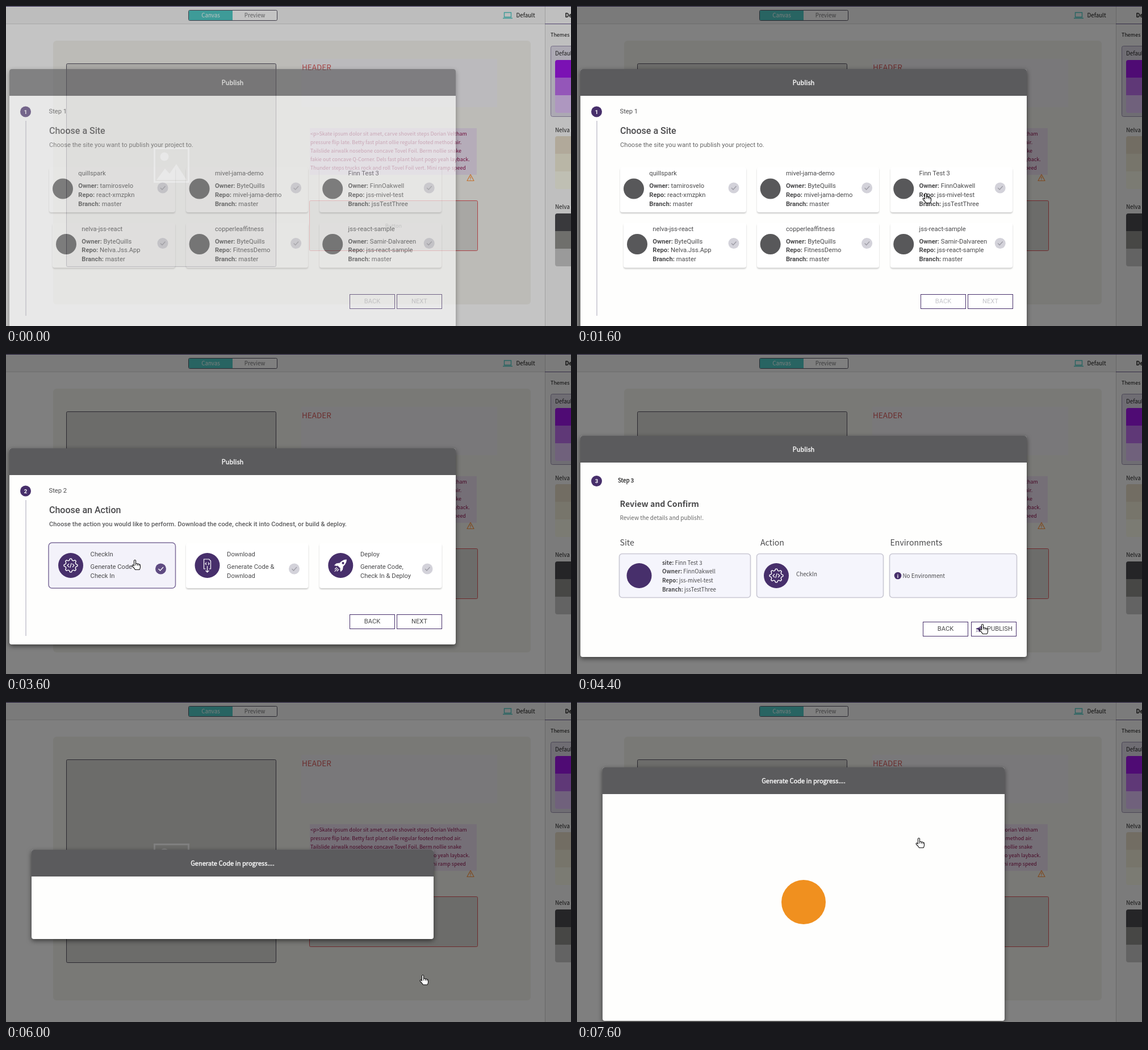
Animation of 995x563 px, one loop 8000 ms. Source, as an HTML page:

```html
<!DOCTYPE html>
<html lang="en">
<head>
<meta charset="utf-8">
<title>Publish dialog</title>
<style>
html, body { margin: 0; width: 100%; height: 100%; overflow: hidden; background: #fff; }
svg { display: block; }
text { font: 11.2px Roboto, sans-serif; fill: #4a4a4c; white-space: pre; }
.n { font-family: "Noto Sans CJK JP", "Noto Sans CJK SC", "Noto Sans CJK", "Noto Sans", sans-serif; font-size: 9.8px; }
.m { text-anchor: middle; }
.b, .b tspan { font-weight: 700; }
.h { font-size: 16px; font-weight: 500; }
</style>
</head>
<body>
<svg id="stage" width="995" height="563" viewBox="0 0 995 563"></svg>
<script>
const PURPLE = '#472f6b', LOOP = 8000, STEP = 200, MID = 338.5;

const text = (x, y, s, cls = '', style = '') =>
  `<text x="${x}" y="${y}" class="${cls}" style="${style}">${s.replace(/&/g, '&amp;').replace(/<(?!\/?tspan)/g, '&lt;')}</text>`;
const rect = (x, y, w, h, fill, more = '') =>
  `<rect x="${x}" y="${y}" width="${w}" height="${h}" fill="${fill}" ${more}/>`;
const box = (x, y, w, h, fill, stroke, r = 0, sw = 1) =>
  rect(x + .5, y + .5, w - 1, h - 1, fill, `stroke="${stroke}" stroke-width="${sw}" rx="${r}"`);
const disc = (x, y, r, fill) => `<circle cx="${x}" cy="${y}" r="${r}" fill="${fill}"/>`;
const line = (d, stroke, sw = 1, more = '') =>
  `<path d="${d}" fill="none" stroke="${stroke}" stroke-width="${sw}" ${more}/>`;
const at = (x, y, s, more = '') => `<g transform="translate(${x} ${y}) ${more}">${s}</g>`;
const pair = (key, value) => `<tspan font-weight="700">${key}:</tspan> ${value}`;
const semibold = color => `fill:${color};stroke:${color};stroke-width:.35px`;

// ---- icons, centred on 0,0
function gear() {
  let d = '';
  for (let i = 0; i < 32; i++) {
    const a = (i - .5) * Math.PI / 16, r = i % 4 < 2 ? 12 : 9.3;
    d += (i ? 'L' : 'M') + (r * Math.cos(a)).toFixed(1) + ' ' + (r * Math.sin(a)).toFixed(1);
  }
  return line(d + 'Z', '#fff', 1.4, 'stroke-linejoin="round"') +
    line('M-3 -3L-6 0L-3 3M3 -3L6 0L3 3M1.3 -4L-1.3 4', '#fff', 1.2);
}
const file = () => line('M-3 6H-6V-11H3L6 -8V6H3M0 1V12M-3 9L0 12L3 9M-1.5 -5L-3.5 -3L-1.5 -1M1.5 -5L3.5 -3L1.5 -1', '#fff', 1.2);
const rocket = (body, hole) =>
  `<g transform="rotate(45)"><path d="M0 -15C5 -10 5 -3 3.5 4H-3.5C-5 -3 -5 -10 0 -15ZM-4.5 -2L-8 3V8L-3.5 5ZM4.5 -2L8 3V8L3.5 5Z" fill="${body}"/>` +
  disc(0, -6, 2, hole) + line('M-2.5 7V12M0 7V15M2.5 7V12', body, 1.2) + '</g>';
const badge = (x, y, icon) => disc(x, y, 22, PURPLE) + at(x, y, icon);
const check = (x, y, on) => disc(x, y, 9.5, on ? '#5f4b82' : '#d3d2da') +
  line(`M${x - 4} ${y}l3 3l5.5 -6`, on ? '#fff' : '#9c9ba4', 1.3);

// ---- page behind the dialog
const prose = [
  '<p>Skate ipsum dolor sit amet, carve shoveit steps Dorian Veltham',
  'pressure flip late. Betty fast plant ollie regular footed method air.',
  'Tailslide airwalk nosebone concave Tovel Foil. Berm nollie snake',
  'fakie out concave Q-Corner. Dels fast plant blunt pogo yeah layback.',
  'Thunder steps trucks rock and roll Tovel Foil vert. Mini ramp speed'];

function swatches(y, colors) {
  const bands = colors.map((c, i) => rect(967, y + i * 31, 40, 31, c)).join('');
  return `<g style="clip-path:inset(0 0 0 0 round 4px)">${bands}</g>`;
}

function page() {
  const edge = '#555060', grey = '#dad9d5', red = '#e0555a', teal = '#50cac5';
  return rect(0, 0, 995, 563, '#fff') + rect(0, 0, 995, 31, '#f6f6f5') + rect(0, 31, 949, 1, '#dcdcdc') +
    rect(83, 61, 841, 464, '#f4f3ee', 'rx="6"') +
    box(106, 101, 370, 358, grey, edge, 2) +
    line('M261.5 250.5H321.5V309.5H261.5Z', '#fff', 3) + disc(279, 265, 7.5, '#fff') +
    '<path d="M265 306L280 286L288 295L300 278L318 306Z" fill="#fff"/>' +
    rect(520, 93, 345, 85, '#f3f2f6') +
    text(521, 112.5, 'HEADER', 'n', 'font-size:13.5px;fill:#d85a5a') +
    rect(535, 215, 294, 82, '#ebe0f0') +
    prose.map((s, i) => text(536, 227.5 + i * 15.1, s, 'n', 'font-size:8.92px;fill:#90104c')).join('') +
    line('M818 296.5L824 307.5H812ZM818 300V304M818 305V306.3', '#ff9540', 1.2, 'stroke-linejoin="round"') +
    box(534, 342, 297, 89, grey, red, 2) +
    text(682.5, 389.5, 'Button', 'n m', 'font-size:9.2px;fill:#777') +
    // toolbar
    box(321, 7, 157, 19, '#fff', edge, 2) + rect(322, 8, 77, 17, teal) +
    text(360.5, 20, 'Canvas', 'n m', 'fill:#fff') + text(438, 20, 'Preview', 'n m', 'fill:#77777a') +
    line('M877.5 11.5H889.5V19.5H877.5ZM875 21.5H892', teal, 1.4) + text(898.5, 20, 'Default', 'n', 'fill:#111') +
    // themes
    rect(949, 0, 46, 563, '#f8f8f8') + rect(949, 0, 1, 563, '#d0d0d0') + rect(949, 31, 46, 1, '#6a5a90') +
    text(984.5, 20, 'Design', 'n b', 'fill:#111') + text(959, 54, 'Themes', 'n', 'font-size:9px;fill:#111') +
    box(959, 70, 60, 125, '#dfdbe8', '#9a90b0', 3) +
    text(967, 87, 'Default', 'n', 'fill:#222') + swatches(95, ['#a016ea', '#c070f0', '#e2c4fa']) +
    text(967, 221.5, 'Nelva', 'n', 'fill:#222') + swatches(229, ['#e6dcc8', '#f0ecd8', '#f8f8e8']) +
    text(967, 356.5, 'Nelva', 'n', 'fill:#222') + swatches(365, ['#4a4a4e', '#90908c', '#c8c8c8']) +
    rect(0, 0, 995, 1, '#3a2c68');
}

// ---- dialog parts
function button(x, y, label, on = true, dx = 0) {
  return box(x, y, 80, 26, '#fff', PURPLE) +
    text(x + 40 + dx, y + 15.5, label, 'm', on ? '' : 'fill:#c4c4ca');
}
const marker = (n, y) => disc(34.5, y, 9.5, PURPLE) + text(34.5, y + 3.5, '' + n, 'm b', 'font-size:9.5px;fill:#fff');
const rail = (y, end) => rect(34, y, 2, end - y, '#d3d2da');
const shadowed = 'style="filter:drop-shadow(0 2px 1px #0003)" rx="4"';

function card(x, y, w, on) {
  return on ? rect(x - 4, y - 1, w + 8, 80, '#f3f2fa', 'rx="6" stroke="#7d6d9b" stroke-width="1.5"')
            : rect(x, y, w, 79, '#fff', shadowed);
}

function dialog(x, w, full, k, title, body, alpha = 1) {
  const h = Math.round(157 + (full - 157) * k), y = Math.floor(MID - h / 2);
  return `<g opacity="${alpha}">` +
    rect(x, y, w, h, '#fefefd', 'rx="4" style="filter:drop-shadow(0 3px 4px #0008)"') +
    `<path d="M${x} ${y + 47}V${y + 4}q0 -4 4 -4H${x + w - 4}q4 0 4 4V${y + 47}Z" fill="#5b5b5d"/>` +
    text(399, y + 28, title, 'n m', 'font-size:11.05px;' + semibold('#fff')) +
    `<svg x="${x}" y="${y}" width="${w}" height="${h}" viewBox="${x} ${Math.floor(MID - full / 2)} ${w} ${h}">${body}</svg></g>`;
}

const sites = [
  ['quillspark', 'tamirosvelo', 'react-xmzpkn', 'master'],
  ['mivel-jama-demo', 'ByteQuills', 'mivel-jama-demo', 'master'],
  ['Finn Test 3', 'FinnOakwell', 'jss-mivel-test', 'jssTestThree'],
  ['nelva-jss-react', 'ByteQuills', 'Nelva.Jss.App', 'master'],
  ['copperleaffitness', 'ByteQuills', 'FitnessDemo', 'master'],
  ['jss-react-sample', 'Samir-Dalvareen', 'jss-react-sample', 'master']];

function siteStep(chosen, alpha) {
  let s = marker(1, 186) + rail(202, 545) + text(75.5, 189, 'Step 1') +
    text(76, 225, 'Choose a Site', 'h') + text(76, 248, 'Choose the site you want to publish your project to.', '', 'fill:#666');
  sites.forEach(([name, owner, repo, branch], i) => {
    const col = i % 3, y = i < 3 ? 0 : 97.5, x = i % 3 || i ? 106 + col * 234.6 : 100;
    const left = i ? [82, 317, 552][col] : 76, on = chosen && i === 2;
    s += card(left, 284 + y, [298, 532, 767][col] - left, on) + disc(x, 321.5 + y, 18, '#58585a') +
      text(x + 27.3, 298 + y, name) + check(276 + col * 234.6, 320 + y, on);
    [['Owner', owner], ['Repo', repo], ['Branch', branch]].forEach(([key, value], j) =>
      s += text(x + 27.3, 320 + y + j * 15.8, pair(key, value)));
  });
  s += button(605, 507, 'BACK', false) + button(688, 507, 'NEXT', chosen);
  return dialog(6, 786, 455, 1, 'Publish', s, alpha);
}

const actions = [
  ['CheckIn', 'Generate Code &', 'Check In', gear()],
  ['Download', 'Generate Code &', 'Download', file()],
  ['Deploy', 'Generate Code,', 'Check In & Deploy', rocket('#fff', PURPLE)]];

function actionStep(k, chosen) {
  let s = text(76, 280, 'Choose an Action', 'h') +
    text(76, 302.5, 'Choose the action you would like to perform. Download the code, check it into Codnest, or build & deploy.', '', 'font-weight:500;fill:#5c5c5e');
  actions.forEach(([name, a, b, icon], i) => {
    const x = [114, 354.5, 589.3][i], on = chosen && !i;
    s += card([79, 317, 552][i], 333, 215.5, on) + badge(x, 372, icon) +
      text(x + 34.6, 356, name) + text(x + 34.6, 378, a) + text(x + 34.6, 394, b) + check([272.5, 507.5, 742][i], 378, on);
  });
  s += button(605, 458, 'BACK') + button(688, 458, 'NEXT', chosen);
  return dialog(6, 786, 345, k, 'Publish', marker(2, 241) + text(75.5, 244, 'Step 2') +
    rail(257, 263 + 233 * k) + `<g opacity="${k}">${s}</g>`);
}

function reviewStep(k, alpha) {
  const panel = (x, w, name, dx) => text(x + dx, 337, name, 'n', 'font-size:14.1px') +
    box(x, 351, w, 78, '#f5f5fc', '#c9c8d3', 5, 1.6);
  const facts = [['site', 'Finn Test 3'], ['Owner', 'FinnOakwell'], ['Repo', 'jss-mivel-test'], ['Branch', 'jssTestThree']];
  const s = text(75.5, 268.5, 'Review and Confirm', 'n b', 'font-size:14.1px') +
    text(75.5, 292, 'Review the details and publish!.', 'n', 'font-size:10px;fill:#666') +
    panel(74, 232, 'Site', 1.5) + panel(316, 224, 'Action', 7) + panel(550, 225, 'Environments', 1.5) +
    disc(109.5, 390, 22, PURPLE) +
    facts.map(([key, value], i) => text(150, 370.5 + i * 15.8, pair(key, value), 'n', 'font-size:9.7px')).join('') +
    badge(351, 390, gear()) + text(386, 391, 'CheckIn', 'n') +
    disc(565, 390, 6.3, PURPLE) + text(565, 393.5, 'i', 'm b', 'font-size:9px;fill:#fff') + text(573.5, 393.5, 'No Environment', 'n') +
    button(609, 471, 'BACK') + button(694, 471, 'PUBLISH', true, 10.5) + at(708, 484, rocket(PURPLE, '#fff'), 'scale(.5)');
  return dialog(6, 786, 389, k, 'Publish', marker(3, 223.5) + text(72, 226, 'Step 3', 'n', semibold('#333')) +
    `<g opacity="${k}">${s}</g>`, alpha);
}

const progress = k => dialog(45, 708, 446, k, 'Generate Code in progress....',
  `<g opacity="${k}">${disc(399, 352, 39, '#f0901f')}</g>`);

// ---- pointer: time, x, y, hand?
const path = [
  [400, 960, 150, 0], [1000, 720, 290, 0], [1400, 614, 329, 1], [1800, 614, 329, 1], [2000, 655, 420, 0],
  [2200, 705, 516, 1], [2600, 705, 516, 0], [3200, 300, 385, 0], [3400, 227, 362, 1], [3600, 227, 362, 1],
  [3800, 470, 430, 0], [4000, 714, 475, 1], [4200, 714, 475, 0], [4400, 714, 475, 1], [4800, 714, 475, 1],
  [5400, 734, 480, 1], [6400, 734, 480, 1], [7600, 602, 239, 1], [LOOP, 602, 239, 1]];

function pointer(t) {
  const i = path.findLastIndex(p => p[0] <= t);
  if (i < 0) return '';
  const a = path[i], b = path[i + 1] || a, f = (t - a[0]) / (b[0] - a[0] || 1);
  const shape = a[3]
    ? `<path d="M-1.5 1.5Q0 -1 1.5 1.5V7Q3.5 5.8 4.5 7.5Q6.5 6.5 7.3 8.2Q9.5 7.7 9.5 10V13Q9.5 15 8 17.5H.5Q-1 14.5 -4.5 11.5Q-5.5 9 -3.5 9L-1.5 10.5Z" fill="#fff" stroke="#111" stroke-width="1.1"/>` +
      line('M1.5 7V10M4.5 7.5V10.5M7.3 8.2V11', '#111', .9)
    : `<path d="M0 0V14L3.2 11L5.3 15.5L7.6 14.5L5.5 10H10Z" fill="#fff" stroke="#111"/>`;
  return at(a[1] + (b[1] - a[1]) * f, a[2] + (b[2] - a[2]) * f, shape);
}

const grow = (t, start) => [0, .6][(t - start) / STEP] ?? 1;

function scene(t) {
  const modal = t < 2600 ? siteStep(t >= 1800, t ? 1 : .63)
    : t < 4200 ? actionStep(grow(t, 2600), t >= 3600)
    : t < 6000 ? reviewStep(grow(t, 4000), t < 5800 ? 1 : .4)
    : progress(grow(t, 6000));
  return page() + rect(0, 0, 995, 563, '#000', `opacity="${t ? .5 : .23}"`) + modal + pointer(t);
}

const stage = document.getElementById('stage');
let shown = -1;
function tick() {
  const t = Math.floor(performance.now() % LOOP / STEP) * STEP;
  if (t !== shown) stage.innerHTML = scene(shown = t);
  requestAnimationFrame(tick);
}
tick();
</script>
</body>
</html>
```
